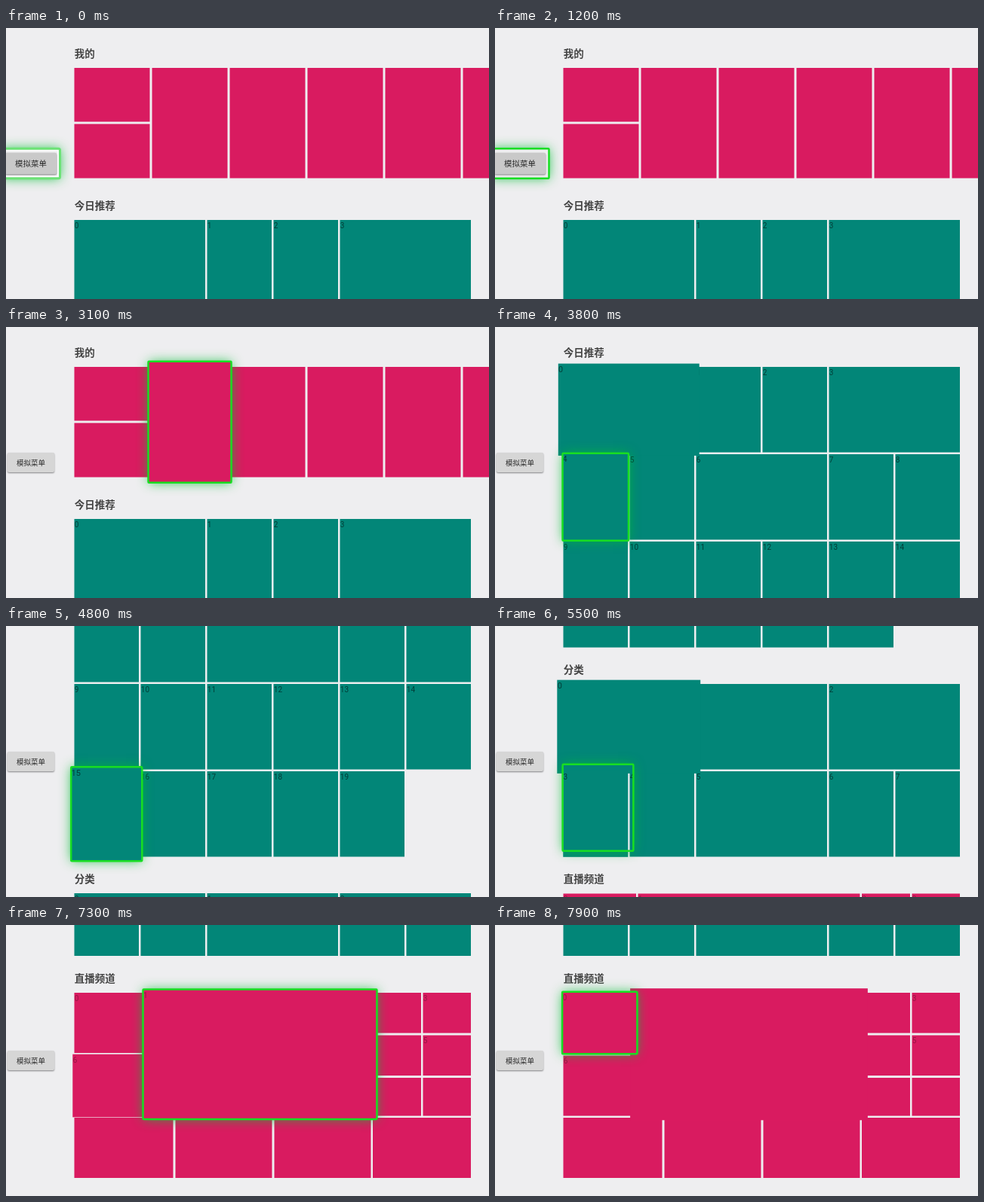
These frames come from a looping animation (640 px wide and 360 px high, 8 s). An HTML page with a canvas:

```html
<!DOCTYPE html>
<html lang="zh">
<head>
<meta charset="utf-8">
<style>
  html, body { margin: 0; width: 100%; height: 100%; overflow: hidden; background: #eeeef0; }
  canvas { display: block; }
</style>
</head>
<body>
<canvas id="stage" width="640" height="360"></canvas>
<script>
const ctx = document.getElementById('stage').getContext('2d');
const LOOP = 8000, SCALE_MS = 400, SCROLL_MS = 360, BORDER_MS = 150, ZOOM = 0.1;
const TEAL = '#028678', PINK = '#d91b60';
const CJK = '"Noto Sans CJK SC", "Noto Sans CJK", sans-serif';

const tiles = [];
const addTile = (x, y, w, h, color, label) => {
  const tile = { x, y, w, h, color, label };
  tiles.push(tile);
  return tile;
};

// Rows of cells on a six-column grid; each digit is a column span.
function addGrid(top, rows) {
  const cells = [];
  rows.forEach((spans, r) => {
    let col = 0;
    for (const span of spans) {
      cells.push(addTile(90.5 + col * 88, top + r * 116, span * 88 - 2.5, 113.5, TEAL, cells.length));
      col += +span;
    }
  });
  return cells;
}

const menu = { x: -2, y: 162, w: 70, h: 36, fixed: true };

const mineTop = addTile(90.5, 53, 100, 71.5, PINK);
const mineBottom = addTile(90.5, 127.5, 100, 72, PINK);
const mineTall = [1, 2, 3, 4, 5].map(i => addTile(90.5 + i * 103, 53, 100, 146.5, PINK));

const today = addGrid(255, ['2112', '11211', '111111', '11111']);
const sorts = addGrid(765, ['222', '11211']);

const LIVE = 1043.5;
const live = [
  [90.5, 0, 96.5, 80], [189.5, 0, 294, 163.5],
  [486, 0, 64, 53.5], [552.5, 0, 63.5, 53.5],
  [486, 56.5, 64, 53.5], [552.5, 56.5, 63.5, 53.5],
  [90.5, 83.5, 96.5, 80],
  [486, 113, 64, 50.5], [552.5, 113, 63.5, 50.5],
  [90.5, 166, 131, 80], [224.5, 166, 128, 80], [355.5, 166, 128, 80], [486, 166, 130, 80]
].map(([x, y, w, h], i) => addTile(x, LIVE + y, w, h, PINK, i < 7 ? i : undefined));

const titles = [['我的', 33.5], ['今日推荐', 235.5], ['分类', 746], ['直播频道', LIVE - 19.5]];

// Focus changes: time, focused item, scroll position it asks for.
const steps = [
  [-2000, menu, 0],
  [1280, mineTop, 0],
  [2090, mineBottom, 0],
  [2680, mineTall[0], 0],
  [3280, today[0], 202],
  [3675, today[4], 202],
  [4040, today[9], 294],
  [4400, today[15], 410],
  [4905, sorts[0], 688],
  [5440, sorts[3], 688],
  [5790, live[0], 953.5],
  [6590, live[6], 953.5],
  [7090, live[1], 953.5],
  [7755, live[0], 953.5]
].map(([time, item, scroll]) => ({ time, item, scroll }));

const clamp = v => Math.min(1, Math.max(0, v));
const smooth = v => (1 - Math.cos(Math.PI * clamp(v))) / 2;
const quint = v => 1 - (1 - clamp(v)) ** 5;
const mix = (a, b, k) => a + (b - a) * k;

function scaledRect(item, level, scroll) {
  const s = 1 + ZOOM * level;
  const y = item.fixed ? item.y : item.y - scroll;
  return [item.x - item.w * (s - 1) / 2, y - item.h * (s - 1) / 2, item.w * s, item.h * s];
}

function drawTile(tile, level, scroll) {
  const [x, y, w, h] = scaledRect(tile, level, scroll);
  if (y > 360 || y + h < 0) return;
  ctx.fillStyle = tile.color;
  ctx.fillRect(x, y, w, h);
  if (tile.label === undefined) return;
  const s = 1 + ZOOM * level;
  ctx.fillStyle = tile.color === TEAL ? 'rgba(0,0,0,.55)' : 'rgba(0,0,0,.3)';
  ctx.font = `${10 * s}px Roboto, sans-serif`;
  ctx.fillText(tile.label, x + 0.3 * s, y + 10.8 * s);
}

function drawMenu(level) {
  const s = 1 + ZOOM * level, gray = Math.round(mix(214, 201, level));
  ctx.save();
  ctx.translate(33, 180);
  ctx.scale(s, s);
  ctx.shadowColor = 'rgba(0,0,0,.45)';
  ctx.shadowBlur = 2;
  ctx.shadowOffsetY = 1;
  ctx.fillStyle = `rgb(${gray},${gray},${gray})`;
  ctx.beginPath();
  ctx.roundRect(-31, -13, 62, 26, 2);
  ctx.fill();
  ctx.shadowColor = 'transparent';
  ctx.fillStyle = '#2a2a2a';
  ctx.font = `500 9.5px ${CJK}`;
  ctx.textAlign = 'center';
  ctx.fillText('模拟菜单', 0, 3.6);
  ctx.restore();
}

function drawBorder([x, y, w, h], shine) {
  const color = `rgb(${mix(24, 108, shine)},${mix(222, 226, shine)},${mix(34, 118, shine)})`;
  ctx.save();
  ctx.beginPath();
  ctx.rect(0, 0, 640, 360);
  ctx.rect(x, y, w, h);
  ctx.clip('evenodd');
  ctx.shadowColor = 'rgba(0,190,50,.85)';
  ctx.shadowBlur = 15;
  ctx.fillStyle = color;
  ctx.fillRect(x, y, w, h);
  ctx.restore();
  if (shine) {
    ctx.strokeStyle = `rgba(255,255,255,${0.8 * shine})`;
    ctx.lineWidth = 2;
    ctx.strokeRect(x + 2.5, y + 2.5, w - 5, h - 5);
  }
  ctx.strokeStyle = color;
  ctx.lineWidth = 2.5 + 0.5 * shine;
  ctx.beginPath();
  ctx.roundRect(x, y, w, h, 1 + shine);
  ctx.stroke();
}

function draw(t) {
  const index = steps.findLastIndex(step => step.time <= t);
  const now = steps[index], before = steps[Math.max(0, index - 1)];
  const age = t - now.time;
  const reached = smooth((now.time - before.time) / SCALE_MS);
  const grow = smooth(age / SCALE_MS), shrink = reached * (1 - grow);
  const scroll = mix(before.scroll, now.scroll, quint(age / SCROLL_MS));
  const levelOf = item => item === now.item ? grow : item === before.item ? shrink : 0;

  ctx.fillStyle = '#eeeef0';
  ctx.fillRect(0, 0, 640, 360);

  ctx.fillStyle = '#444';
  ctx.font = `bold 13.5px ${CJK}`;
  for (const [text, y] of titles) ctx.fillText(text, 90.8, y - scroll + 5);

  for (const tile of tiles) {
    if (tile !== now.item && tile !== before.item) drawTile(tile, 0, scroll);
  }
  for (const { item } of [before, now]) {
    if (!item.fixed) drawTile(item, levelOf(item), scroll);
  }
  drawMenu(levelOf(menu));

  const from = scaledRect(before.item, reached, before.scroll);
  const to = scaledRect(now.item, grow, now.scroll);
  const moved = quint(age / BORDER_MS);
  const shine = now.item === menu ? 1 - smooth(t / 1200) : 0;
  drawBorder(to.map((v, i) => mix(from[i], v, moved)), shine);
}

function tick() {
  draw(performance.now() % LOOP);
  requestAnimationFrame(tick);
}
tick();
</script>
</body>
</html>
```
